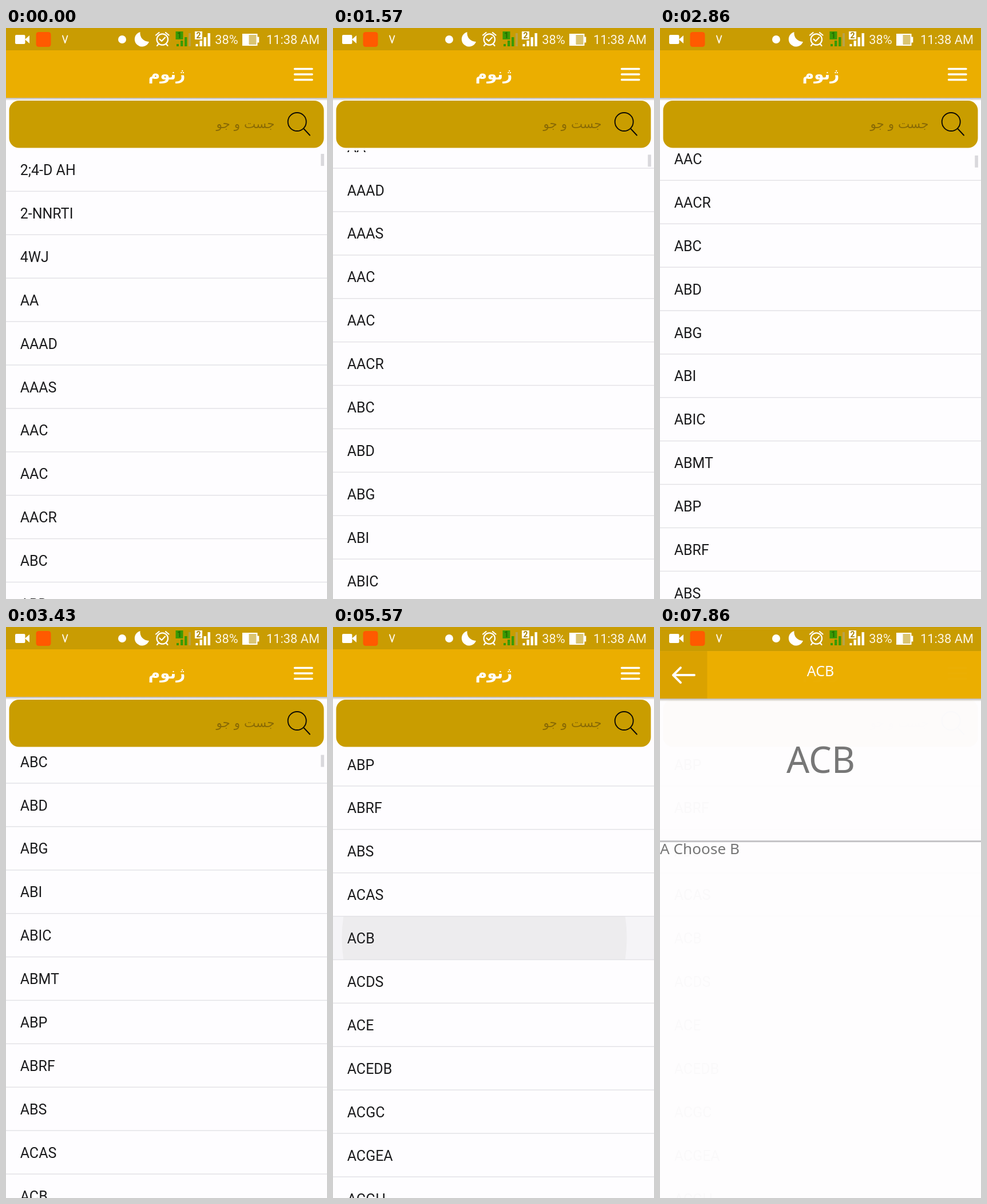
An HTML page for the animation above (8 s loop, 561 px wide and 998 px high).

```html
<!DOCTYPE html>
<html lang="fa">
<head>
<meta charset="utf-8">
<title>Glossary list</title>
<style>
  html, body { margin: 0; width: 100%; height: 100%; overflow: hidden; background: #fefdff; }
  svg { display: block; width: 100vw; height: 100vh; }
  text { white-space: pre; }
  .ui { font-family: Roboto, sans-serif; }
  .page { font-family: "Noto Sans", "Open Sans", sans-serif; }
  .fa { font-family: "DejaVu Sans", sans-serif; direction: rtl; text-anchor: middle; }
  .mid { text-anchor: middle; }
  .line { fill: none; stroke-linecap: round; stroke-linejoin: round; }
</style>
</head>
<body>
<svg viewBox="0 0 561 998" preserveAspectRatio="none">
  <defs>
    <linearGradient id="shade" x2="0" y2="1">
      <stop offset="0" stop-color="#8e8a84" stop-opacity=".6"/>
      <stop offset="1" stop-color="#8e8a84" stop-opacity="0"/>
    </linearGradient>
    <clipPath id="listArea"><rect y="214" width="561" height="784"/></clipPath>
    <clipPath id="rowArea"><rect id="rowClip" width="561" height="75"/></clipPath>
    <g id="bars">
      <rect x="1" y="28" width="4" height="4"/>
      <rect x="8" y="22" width="4.5" height="10"/>
      <rect x="15" y="16" width="4.5" height="16"/>
    </g>
    <g id="appBar">
      <rect width="561" height="39.5" fill="#c99c02"/>
      <rect y="39" width="561" height="83" fill="#ebae00"/>
      <rect y="122" width="561" height="5" fill="url(#shade)"/>
    </g>
  </defs>

  <!-- list screen -->
  <rect width="561" height="998" fill="#fefdff"/>
  <g clip-path="url(#listArea)">
    <g id="list" class="ui" font-size="25" fill="#1b1b1d">
      <g id="ripple" clip-path="url(#rowArea)">
        <rect id="rowTint" width="561" height="75.9" fill="#f5f4f7"/>
        <circle id="wave" cx="264.5" fill="#edecee"/>
      </g>
    </g>
    <rect id="thumb" x="550.3" width="5.6" height="21" fill="#d9d8dc"/>
  </g>
  <use href="#appBar"/>
  <text class="fa" x="281" y="90" font-size="28" font-weight="bold" fill="#fff">ژنوم</text>
  <path class="line" d="M504.500 71.500H535M504.500 81H535M504.500 90.500H535" stroke="#fff" stroke-width="3.4"/>
  <rect x="5.500" y="127" width="550" height="82.500" rx="17" fill="#c99d00"/>
  <text class="fa" x="418.500" y="175" font-size="21.500" fill="#896a05">جست و جو</text>
  <g class="line" stroke="#0c0a04" stroke-width="1.900">
    <circle cx="508.700" cy="164" r="16"/>
    <path d="M520.300 176L531 187.500"/>
  </g>

  <!-- detail screen -->
  <g id="detail" class="page">
    <rect width="561" height="998" fill="#fefdfe"/>
    <use href="#appBar"/>
    <rect id="press" y="39" width="82.500" height="83" fill="#000" opacity=".07"/>
    <path class="line" d="M60 81H23M36 68L23 81L36 94" stroke="#fff" stroke-width="4"/>
    <text class="mid" x="280.500" y="83" font-size="25" fill="#fff">ACB</text>
    <text class="mid" x="281" y="251.500" font-size="63" fill="#757575">ACB</text>
    <rect y="370" width="561" height="3" fill="#c3c2c5"/>
    <text x="0" y="393.500" font-size="26.200" fill="#757575">A Choose B</text>
  </g>

  <!-- status icons -->
  <g fill="#fff">
    <rect x="16" y="12" width="17.500" height="16" rx="2"/>
    <path d="M33 20L41 13V27Z"/>
    <rect x="52.500" y="7" width="26" height="26" rx="4.500" fill="#ff5a00"/>
    <path class="line" d="M99 13.500L103.200 26L107.400 13.500" stroke="#fdf6e4" stroke-width="2"/>
    <circle cx="203" cy="20" r="7"/>
    <path d="M234.500 7A13 13 0 1 0 250 24A15 15 0 0 1 234.500 7Z"/>
    <g class="line" stroke="#fff" stroke-width="2.200">
      <circle cx="273.300" cy="20" r="9.700"/>
      <path d="M268.500 19.500L272 23L278 16.500M262 12.500L267.500 8M284.500 12.500L279 8M266.500 28L264 31M280 28L282.500 31"/>
    </g>
    <g fill="#3a9a05">
      <rect x="296.500" y="6" width="13" height="14"/>
      <use href="#bars" x="297"/>
    </g>
    <rect x="319" y="9" width="4" height="23" fill="#b9a24a"/>
    <rect x="330" y="6" width="13" height="14"/>
    <use href="#bars" x="330.500"/>
    <rect x="352.500" y="9" width="4.500" height="23"/>
    <g class="ui mid" font-size="14" font-weight="bold" fill="#a98300">
      <text x="303" y="18" fill="#246c00">1</text>
      <text x="336.500" y="18">2</text>
    </g>
    <rect x="414" y="11" width="24.500" height="19" fill="#dac471" stroke="#fff" stroke-width="2"/>
    <rect x="414" y="11" width="10.500" height="19"/>
    <rect x="439" y="15.500" width="3.300" height="10"/>
    <g class="ui" font-size="21.800" fill="#fdf6e4">
      <text x="365.300" y="28">38%</text>
      <text x="455" y="28">11:38 AM</text>
    </g>
  </g>
</svg>
<script>
const LOOP = 8000, FPS = 7, ROW = 75.9, TOP = 209.5, PICKED = 19;
const names = ("2;4-D AH|2-NNRTI|4WJ|AA|AAAD|AAAS|AAC|AAC|AACR|ABC|ABD|ABG|ABI|ABIC|ABMT|ABP|" +
  "ABRF|ABS|ACAS|ACB|ACDS|ACE|ACEDB|ACGC|ACGEA|ACGH").split("|");

// Each swipe: first step, number of steps, distance, skew of the easing.
const swipes = [[7, 7, 310, .7807], [15, 10, 385.5, 1.0558], [27, 8, 450.5, .8879]];

const $ = id => document.getElementById(id);
const clamp = v => Math.min(1, Math.max(0, v));
const smooth = v => v * v * (3 - 2 * v);
const set = (el, attrs) => { for (const k in attrs) el.setAttribute(k, attrs[k]); };

function add(tag, attrs, label) {
  const el = document.createElementNS("http://www.w3.org/2000/svg", tag);
  set(el, attrs);
  if (label) el.textContent = label;
  $("list").append(el);
}

names.forEach((name, i) => {
  const bottom = TOP + (i + 1) * ROW;
  add("rect", { y: bottom - .7, width: 561, height: 1.4, fill: "#e2e1e5" });
  add("text", { x: 24.7, y: bottom - 28.4 }, name);
});

const rowTop = TOP + PICKED * ROW;
set($("rowClip"), { y: rowTop, height: ROW });
set($("rowTint"), { y: rowTop });
set($("wave"), { cy: rowTop + ROW / 2 });

function stepAt(t) {
  const k = Math.floor(t * FPS / 1000 + .05);
  return Math.round(k * 100 / FPS) * 10 > t ? k - 1 : k;
}

const scrollAt = k => swipes.reduce((sum, [first, count, dist, skew]) =>
  sum + dist * smooth(clamp((k - first + 1) / count) ** skew), 0);

function drawList(k, t) {
  const scroll = scrollAt(k);
  set($("list"), { transform: `translate(0 ${-scroll})` });
  set($("thumb"), { y: 220 + scroll * .0051, opacity: 1 - clamp((t - 5060) / 300) });
  const touched = t > 5200 && t < 7000;
  set($("ripple"), { opacity: touched ? clamp((t - 5200) / 200) : 0 });
  set($("wave"), { r: Math.min(290, 249 * clamp((t - 5200) / 371.4) + Math.max(0, t - 5572) * .4) });
}

function drawDetail(t) {
  const open = clamp((t - 5640) / 350), close = clamp((t - 7800) / 250);
  const shift = 80 * (1 - open) ** 5 + 80 * close ** 2.2;
  const alpha = 1 - (1 - clamp((t - 5640) / 200)) ** 4 - .07 * close;
  set($("detail"), { transform: `translate(0 ${shift})`, opacity: alpha });
  set($("press"), { opacity: .07 * clamp((t - 7500) / 150) });
}

function render(ms) {
  const k = stepAt(ms % LOOP), t = k * 1000 / FPS;
  drawList(k, t);
  drawDetail(t);
}

function tick() {
  render(performance.now());
  requestAnimationFrame(tick);
}
tick();
</script>
</body>
</html>
```
